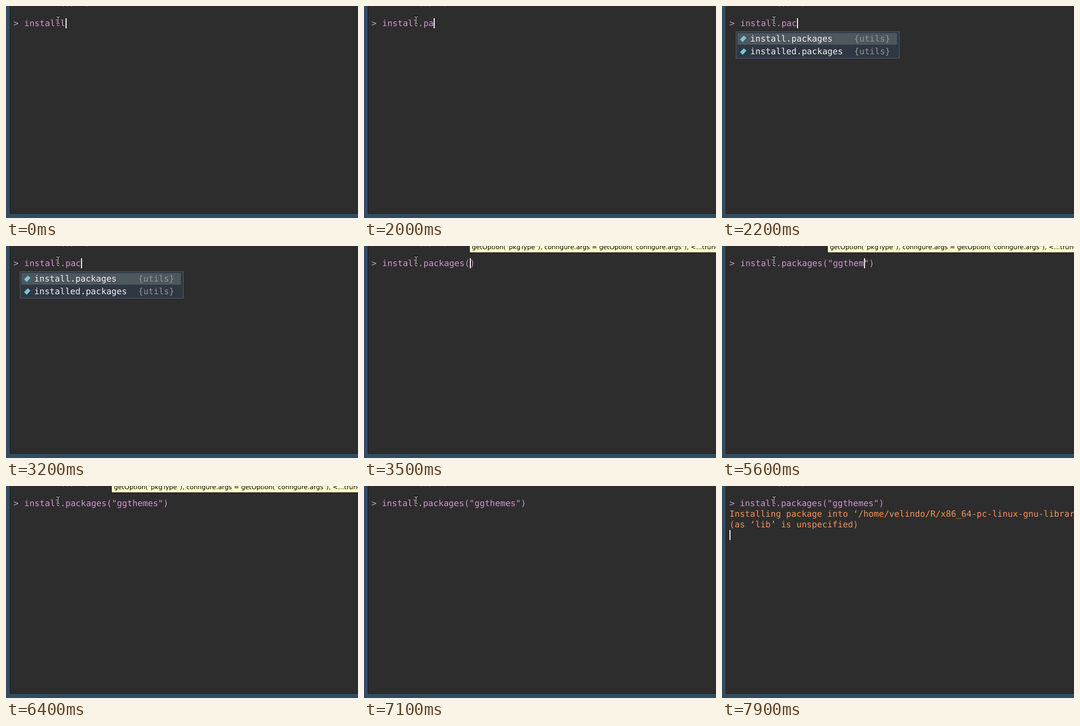
These frames come from a looping animation (662 by 400 pixels, 8000 ms). An HTML page:

```html
<!DOCTYPE html>
<html lang="en">
<head>
<meta charset="utf-8">
<title>Console session</title>
<style>
  html, body { margin: 0; width: 100%; height: 100%; overflow: hidden; background: #304c63; }
  svg { display: block; width: 662px; height: 400px; }
  text { font: 16.1px "DejaVu Sans Mono", monospace; white-space: pre; text-rendering: geometricPrecision; }
  .input { fill: #c9c; }
  .output { fill: #f99157; }
  .choice { fill: #f0f0f0; }
  .origin { fill: #939699; }
  .tip { font: 11.9px "DejaVu Sans", sans-serif; fill: #000; }
</style>
</head>
<body>
<svg viewBox="0 0 662 400">
  <rect width="662" height="400" fill="#304c63"/>
  <rect x="7" width="655" height="392" fill="#191c1f"/>
  <rect x="8" width="654" height="391" fill="#2d2d2d"/>
  <path d="M107 0l1 1M115 1l1-1M123 1l1-1M151 1l1-1" stroke="#aaa" fill="none"/>

  <text class="input" x="14" y="38">&gt;</text>
  <text class="input" id="line" y="38"></text>

  <g class="output" id="output">
    <text x="14" y="58">Installing package into ‘/home/velindo/R/x86_64-pc-linux-gnu-library</text>
    <text x="14" y="78">(as ‘lib’ is unspecified)</text>
  </g>

  <g id="popup">
    <rect x="26.5" y="48.5" width="307" height="50" fill="#2f3842" stroke="#4b6075"/>
    <rect x="29" y="51" width="300" height="22" fill="#4d575e"/>
    <path id="gem" d="M34 63L41 56L46 60L39 68Z" fill="#7ac7dc"/>
    <use href="#gem" y="24"/>
    <text class="choice" x="53" y="67">install.packages</text>
    <text class="origin" x="248.5" y="67">{utils}</text>
    <text class="choice" x="53" y="91">installed.packages</text>
    <text class="origin" x="248.5" y="91">{utils}</text>
  </g>

  <g id="tip">
    <rect x="198.5" y="-10.5" width="480" height="23" fill="#ffffcb" stroke="#1c1c1c"/>
    <text class="tip" x="203" y="6">getOption("pkgType"), configure.args = getOption("configure.args"), &lt;...truncated...&gt;</text>
  </g>

  <rect id="caret" width="2" height="19" fill="#f2f2f2"/>

  <g fill="none">
    <path d="M94.5 20.5H97L98 21.5L99 20.5H101.5M98 21V33M94.5 33.5H97L98 32.5L99 33.5H101.5" stroke="#111" stroke-width="3"/>
    <path d="M95 20.5H97L98 21.5L99 20.5H101M98 21V33M95 33.5H97L98 32.5L99 33.5H101" stroke="#eee"/>
  </g>
</svg>
<script>
  const LOOP = 8000, ADVANCE = 9.69, INPUT_X = 34.2, HISTORY_X = 33.4;
  const ENTER = 6500, PRINTED = 7800;

  // "|" marks the caret inside the typed line.
  const edits = [
    [0, 'installl|'], [100, 'install|'], [1500, 'install.|'], [1800, 'install.p|'],
    [2000, 'install.pa|'], [2200, 'install.pac|'], [3500, 'install.packages(|)'],
    [3900, 'install.packages("|")']
  ];
  const letterTimes = [4700, 4800, 5200, 5300, 5500, 5600, 5700, 5800];
  letterTimes.forEach((time, i) =>
    edits.push([time, `install.packages("${'ggthemes'.slice(0, i + 1)}|")`]));

  const caretOff = [[800, 1200], [2800, 3200], [4500, 4700], [6400, 6500], [7100, 7500]];

  const el = id => document.getElementById(id);
  const [line, output, popup, tip, caret] = ['line', 'output', 'popup', 'tip', 'caret'].map(el);
  const within = (t, from, to) => t >= from && t < to;
  const show = (node, on) => node.setAttribute('visibility', on ? 'visible' : 'hidden');

  function draw(t) {
    const typed = edits.filter(([time]) => time <= t).pop()[1];
    const entered = t >= ENTER;
    line.textContent = typed.replace('|', '');
    line.setAttribute('x', entered ? HISTORY_X : INPUT_X);

    caret.setAttribute('x', entered ? 14 : Math.round(INPUT_X + typed.indexOf('|') * ADVANCE));
    caret.setAttribute('y', t >= PRINTED ? 83 : entered ? 43 : 23);
    show(caret, !caretOff.some(([from, to]) => within(t, from, to)));

    show(popup, within(t, 2200, 3500));
    show(tip, within(t, 3500, ENTER));
    show(output, t >= PRINTED);
  }

  const start = performance.now();
  function tick(now) {
    draw(Math.max(0, now - start) % LOOP);
    requestAnimationFrame(tick);
  }
  draw(0);
  requestAnimationFrame(tick);
</script>
</body>
</html>
```
